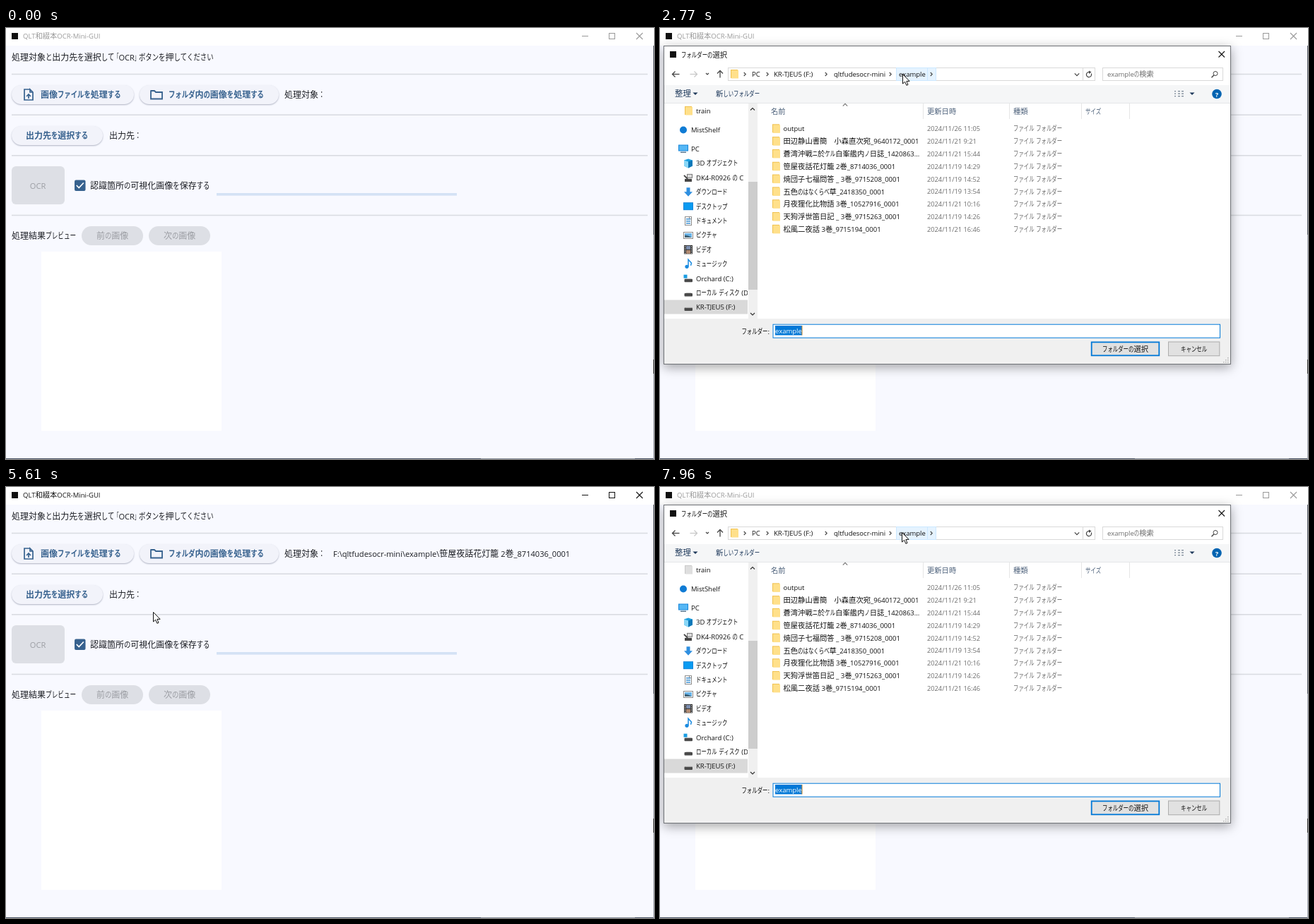
Recreate the animation shown at these times as an HTML page with a canvas. Size 917x611 px, loop 8000 ms.

```html
<!DOCTYPE html>
<html lang="ja">
<head>
<meta charset="utf-8">
<title>Folder picker</title>
<style>
html, body { margin: 0; width: 100%; height: 100%; overflow: hidden; background: #f8f9ff; }
canvas { display: block; width: 917px; height: 611px; }
</style>
</head>
<body>
<canvas id="stage"></canvas>
<script>
const W = 917, H = 611, LOOP = 8000, STEP = 65;
const canvas = document.getElementById('stage');
const ctx = canvas.getContext('2d');
const dpr = window.devicePixelRatio || 1;
canvas.width = W * dpr;
canvas.height = H * dpr;

const APP = 'QLT和綴本OCR-Mini-GUI';
const REPO = 'qltfudesocr-mini';
const DRIVE = 'KR-TJEU5 (F:)';
const BOOK = '笹屋夜話花灯籠 2巻_8714036_0001';
const BLUE = '#36618e', ACCENT = '#0078d7';

const FILES = [
  ['output', '26 11:05'],
  ['田辺静山書簡　小森直次宛_9640172_0001', '21 9:21'],
  ['蒼湾沖戦ニ於ケル白峯艦内ノ日誌_1420863...', '21 15:44'],
  [BOOK, '19 14:29'],
  ['焼団子七福問答 _ 3巻_9715208_0001', '19 14:52'],
  ['五色のはなくらべ草_2418350_0001', '19 13:54'],
  ['月夜狸化比物語 3巻_10527916_0001', '21 10:16'],
  ['天狗浮世笛日記 _ 3巻_9715263_0001', '19 14:26'],
  ['松風二夜話 3巻_9715194_0001', '21 16:46']
];

const PLACES = [
  ['3D オブジェクト', 'cube'], ['DK4-R0926 の C', 'device'], ['ダウンロード', 'down'],
  ['デスクトップ', 'desktop'], ['ドキュメント', 'page'], ['ピクチャ', 'picture'],
  ['ビデオ', 'film'], ['ミュージック', 'note'], ['Orchard (C:)', 'system'],
  ['ローカル ディスク (D', 'drive'], [DRIVE, 'drive']
];

// time, x, y of the pointer
const PATH = [
  [180, 905, 330], [760, 287, 98], [1240, 287, 98], [1650, 360, 82], [1860, 360, 82],
  [1980, 343, 65], [2770, 343, 65], [2900, 232, 176], [3080, 232, 176], [3300, 221, 219],
  [3610, 221, 219], [3740, 221, 200], [4400, 221, 200], [5000, 655, 451], [5210, 655, 451],
  [5460, 240, 215], [5600, 240, 215], [5610, 208, 177], [5870, 78, 152], [6200, 78, 152],
  [6390, 156, 137], [6450, 156, 137], [7000, 342, 64]
];
const CLICKS = [[820, 940], [1990, 2160], [3740, 3800], [3860, 3920], [5060, 5210], [6000, 6130], [7310, 7450]];

const within = (t, a, b) => t >= a && t < b;

function pointer(t) {
  if (t < PATH[0][0]) return null;
  const i = PATH.findIndex(k => k[0] > t);
  if (i < 0) return PATH[PATH.length - 1].slice(1);
  const [t0, x0, y0] = PATH[i - 1], [t1, x1, y1] = PATH[i];
  const u = Math.floor((t - t0) / STEP) * STEP / (t1 - t0);
  const e = u * u * (3 - 2 * u);
  return [x0 + (x1 - x0) * e, y0 + (y1 - y0) * e];
}

// ---- drawing helpers ----
function rect(x, y, w, h, fill) { ctx.fillStyle = fill; ctx.fillRect(x, y, w, h); }

function frame(x, y, w, h, color, lw = 1) {
  ctx.strokeStyle = color;
  ctx.lineWidth = lw;
  ctx.strokeRect(x + lw / 2, y + lw / 2, w - lw, h - lw);
}

function round(x, y, w, h, r, fill) {
  ctx.beginPath();
  ctx.roundRect(x, y, w, h, r);
  ctx.fillStyle = fill;
  ctx.fill();
}

function disc(x, y, r, fill) {
  ctx.beginPath();
  ctx.arc(x, y, r, 0, 7);
  ctx.fillStyle = fill;
  ctx.fill();
}

function line(pts, color, lw = 1) {
  ctx.beginPath();
  for (let i = 0; i < pts.length; i += 2) ctx.lineTo(pts[i], pts[i + 1]);
  ctx.strokeStyle = color;
  ctx.lineWidth = lw;
  ctx.stroke();
}

function poly(pts, fill) {
  ctx.beginPath();
  for (let i = 0; i < pts.length; i += 2) ctx.lineTo(pts[i], pts[i + 1]);
  ctx.closePath();
  ctx.fillStyle = fill;
  ctx.fill();
}

// UI lettering: narrow kana, half-width brackets, full kanji, slightly smaller Latin
const RUNS = /[「」]+|[\u3001-\u300b\u300e-\u30ff\uff01-\uff5e]+|[\u3000\u3400-\u9fff]+|[^\u3000-\u9fff\uff01-\uff5e]+/g;
const BRACKET = /^[「」]/, KANA = /^[\u3001-\u30ff\uff01-\uff5e]/, KANJI = /^[\u3000\u3400-\u9fff]/;

function text(s, x, y, { size = 10.3, color = '#111', align = 0, weight = 400, kana = 0.72 } = {}) {
  const runs = s.match(RUNS).map(str => {
    const cjk = KANA.test(str) || KANJI.test(str);
    const font = cjk
      ? `${weight} ${size}px "Noto Sans CJK JP", "Noto Sans CJK", sans-serif`
      : `${weight} ${size * 0.925}px "Open Sans", "Noto Sans", sans-serif`;
    ctx.font = font;
    const k = BRACKET.test(str) ? 0.5 : KANA.test(str) ? kana : 1;
    return { str, font, k, w: ctx.measureText(str).width * k };
  });
  x -= align * runs.reduce((sum, r) => sum + r.w, 0);
  ctx.fillStyle = color;
  for (const r of runs) {
    ctx.save();
    ctx.translate(x, y + size * 0.37);
    ctx.scale(r.k, 1);
    ctx.font = r.font;
    ctx.fillText(r.str, 0, 0);
    ctx.restore();
    x += r.w;
  }
}

function chevron(x, y, dir, color = '#444', s = 2.5) {
  if (dir === 'right') line([x - s / 2, y - s, x + s / 2, y, x - s / 2, y + s], color, 1.1);
  else {
    const d = dir === 'down' ? s / 2 : -s / 2;
    line([x - s, y - d, x, y + d, x + s, y - d], color, 1.2);
  }
}

function arrow(x, y, dir, color) {
  ctx.save();
  ctx.translate(x, y);
  ctx.rotate(dir * Math.PI / 2);
  line([5, 0, -5, 0], color, 1.3);
  line([-1, -4, -5, 0, -1, 4], color, 1.3);
  ctx.restore();
}

function folder(x, y, front = '#ffe08a', back = '#f0c14f') {
  rect(x, y - 6, 10, 12, back);
  rect(x + 1, y - 5, 10, 11.5, front);
}

function sheet(x, y) {
  rect(x, y - 6, 10, 13, '#fff');
  frame(x, y - 6, 10, 13, '#8a8a8a');
  line([x + 6.5, y - 6, x + 6.5, y - 2.5, x + 10, y - 2.5], '#8a8a8a');
}

function monitor(x, y, stand) {
  rect(x, y - 5.5, 14, stand ? 9 : 11, '#1685d9');
  rect(x + 1, y - 4.5, 12, stand ? 7 : 9, stand ? '#55b7f5' : '#0a9bf2');
  if (stand) rect(x + 3, y + 4.5, 8, 1.5, '#5f7d95');
}

function drive(y) {
  round(34.5, y + 1, 11.5, 4.5, 1, '#4a4a4a');
  poly([36, y + 1, 37.5, y, 43.5, y, 45, y + 1], '#c9c9c9');
}

const ICONS = {
  cube(y) {
    poly([34, y - 4, 40, y - 6, 46, y - 4, 46, y + 4, 40, y + 7, 34, y + 4], '#1ba1e2');
    poly([34, y - 4, 40, y - 2, 40, y + 7, 34, y + 4], '#8ad7f7');
    poly([40, y - 2, 46, y - 4, 46, y + 4, 40, y + 7], '#0b78b8');
  },
  device(y) {
    rect(38, y - 5, 8, 6, '#777');
    rect(39, y - 4, 6, 4, '#ddd');
    line([34, y - 3, 39, y + 2], '#444', 2);
    rect(35, y + 2, 10, 4, '#444');
  },
  down(y) {
    poly([37.5, y - 6, 42.5, y - 6, 42.5, y, 46, y, 40, y + 6.5, 34, y, 37.5, y], '#2f8fe0');
  },
  desktop(y) { monitor(33, y, false); },
  page(y) {
    sheet(35, y);
    for (const d of [-3, 0, 3]) rect(37, y + d, 6, 1.5, '#3c8fd0');
  },
  picture(y) {
    rect(33, y - 4.5, 14, 10, '#fff');
    frame(33, y - 4.5, 14, 10, '#8a8a8a');
    rect(35, y - 2.5, 10, 6, '#6ab4e8');
    poly([35, y + 3.5, 35, y, 40, y + 1, 45, y + 3.5], '#3d6073');
  },
  film(y) {
    rect(34, y - 6, 12, 12.5, '#333');
    rect(37, y - 5, 6, 5, '#7d8fb0');
    rect(37, y + 1, 6, 5, '#b08a72');
    for (let d = -4.5; d < 6; d += 3) { rect(35, y + d, 1, 1.5, '#eee'); rect(44, y + d, 1, 1.5, '#eee'); }
  },
  note(y) {
    disc(38, y + 4, 2.6, '#1b8be0');
    line([40, y + 4, 40, y - 6, 44.5, y - 1, 43.5, y + 2.5], '#1b8be0', 1.5);
  },
  system(y) { drive(y); rect(33.5, y - 5, 5, 5, '#1b9de2'); },
  drive
};

// ---- main window ----
function pill(x, y, w, label, lx, hot, off) {
  ctx.save();
  if (!off) {
    ctx.shadowColor = 'rgba(40,50,80,.35)';
    ctx.shadowBlur = 2 * dpr;
    ctx.shadowOffsetY = dpr;
  }
  round(x, y, w, 27, 13.5, off ? '#dddfe5' : hot ? '#e2e8f3' : '#f2f3fa');
  ctx.restore();
  text(label, lx, y + 13.8, { size: 12, kana: 0.78, color: off ? '#9b9da3' : BLUE, weight: off ? 500 : 700 });
}

function windowButtons(color) {
  line([815, 11.5, 824, 11.5], color);
  frame(853, 7, 9, 9, color);
  line([892, 7, 901, 16], color, 1.1);
  line([901, 7, 892, 16], color, 1.1);
}

function mainWindow(t, p, active, open) {
  const body = { size: 12, kana: 0.78, color: '#1b1d22' };
  const over = (x, y, w) => !open && p && p[0] > x && p[0] < x + w && p[1] > y && p[1] < y + 28;
  rect(0, 0, W, H, '#f8f9ff');
  rect(0, 0, W, 25, '#fff');
  rect(8, 7, 9, 9, '#111');
  text(APP, 24, 11.5, { color: active ? '#111' : '#999' });
  windowButtons(active ? '#111' : '#999');

  text('処理対象と出力先を選択して「OCR」ボタンを押してください', 8, 42, body);
  for (const y of [64.7, 122.4, 180, 264.7]) rect(8, y, 900, 1.6, '#dadce2');

  pill(8, 81, 173, '画像ファイルを処理する', 49, over(8, 81, 173));
  line([34, 87, 26, 87, 26, 102, 38, 102, 38, 91, 34, 87, 34, 91, 38, 91], BLUE, 1.7);
  line([32, 100, 32, 94], BLUE, 1.7);
  line([29, 97, 32, 94, 35, 97], BLUE, 1.7);
  pill(189, 81, 197, 'フォルダ内の画像を処理する', 230, over(189, 81, 197));
  line([205, 89, 210, 89, 212, 91, 221, 91, 221, 100.5, 205, 100.5, 205, 88.2], BLUE, 1.8);
  text('処理対象：', 394, 95, body);
  if (t >= 5330) text(`F:\\${REPO}\\example\\${BOOK}`, 463, 95, body);

  pill(8, 139, 129, '出力先を選択する', 28, over(8, 139, 129));
  text('出力先：', 146, 152.5, body);

  round(8, 196, 75, 54, 6, '#dddfe5');
  text('OCR', 45, 224, { size: 12, color: '#9b9da3', align: 0.5, weight: 500 });
  round(97, 215.5, 15.5, 15.5, 2, BLUE);
  line([99.8, 223, 103.2, 226.5, 109.8, 219.5], '#fff', 1.7);
  text('認識箇所の可視化画像を保存する', 119, 223.5, body);
  rect(298, 234, 340, 3.6, '#d4e2f5');

  text('処理結果プレビュー', 8, 294.5, { ...body, kana: 0.72 });
  pill(107, 281, 87, '前の画像', 128, false, true);
  pill(202, 281, 87, '次の画像', 223, false, true);
  rect(50, 317, 255, 254, '#fff');

  rect(0, 610, W, 1, '#4c5566');
  rect(672, 610, 218, 1, '#8a909c');
  rect(916, 25, 1, 268, '#555b66');
  rect(916, 293, 1, 318, '#a9adb8');
  rect(916, 470, 1, 20, '#333');
}

// ---- folder dialog ----
function crumbs(s) {
  const items = s.view === 'book'
    ? [[DRIVE, 130], [REPO, 214], ['example', 306], [BOOK, 363]]
    : [['PC', 130], [DRIVE, 161], [REPO, 246], ['example', 338]];
  const marks = s.view === 'book' ? [204, 296, 352] : [120, 152, 235, 326, 384];
  if (s.view === 'output') items.push(['output', 394]);
  const hotX = s.view === 'book' ? 302 : 334;
  if (s.hot) {
    rect(hotX, 56, 57, 19, s.hot > 1 ? '#cce8ff' : '#e5f3ff');
    frame(hotX, 56, 45, 19, s.hot > 1 ? '#99d1ff' : '#cce8ff');
    frame(hotX + 44, 56, 13, 19, s.hot > 1 ? '#99d1ff' : '#cce8ff');
  }
  folder(100, 65);
  if (s.view === 'book') text('«', 116, 64.5);
  marks.forEach((x, i) => chevron(x, 65.5, s.drop && i === marks.length - 1 ? 'down' : 'right'));
  for (const [label, x] of items) text(label, x, 65.5);
}

function navigation(s) {
  const idle = '#c8c8c8', ink = '#444';
  arrow(22.5, 65.5, 0, s.back ? ink : idle);
  arrow(47.5, 65.5, 2, idle);
  chevron(67, 65, 'down', s.back ? ink : idle, 2);
  arrow(85, 65.5, 1, ink);
  frame(96, 56, 520, 19, '#d9d9d9');
  crumbs(s);
  rect(598, 56, 1, 19, '#d9d9d9');
  chevron(590, 66, 'down', '#444', 3.2);
  ctx.beginPath();
  ctx.arc(607, 66, 3.6, -0.4, 4.9);
  ctx.strokeStyle = ink;
  ctx.lineWidth = 1.2;
  ctx.stroke();
  poly([607, 60.5, 610.5, 62.5, 607, 65], ink);

  if (!s.ready) {
    rect(627, 56, 1, 19, '#d9d9d9');
    rect(796, 56, 1, 19, '#d9d9d9');
    return;
  }
  frame(626, 56, 171, 19, '#d9d9d9');
  const hint = s.view === 'book' ? BOOK.slice(0, -4) + '...' : (s.view === 'list' ? 'example' : 'output') + 'の検索';
  text(hint, 633, 65.5, { color: '#6d6d6d' });
  ctx.beginPath();
  ctx.arc(786, 64.5, 3, 0, 7);
  ctx.strokeStyle = ink;
  ctx.stroke();
  line([784, 66.8, 780.5, 70.3], ink, 1.4);
}

function toolbar(s) {
  const ink = '#1e395b';
  rect(6, 81, 801, 25, '#f5f6f7');
  rect(6, 106, 801, 1, '#e4e6e8');
  disc(788, 93.5, 6.8, '#0063b1');
  text('?', 788, 93.7, { color: '#fff', align: 0.5, weight: 700 });
  if (!s.ready) return;
  text('整理', 21, 93, { size: 11.4, color: ink });
  text('新しいフォルダー', 79, 93, { color: ink });
  for (const x of [50, 753]) poly([x - 3.5, 91.5, x + 3.5, 91.5, x, 95], ink);
  if (s.view === 'book') {
    frame(728, 89, 13, 9, '#888');
    rect(730, 91, 6, 4, '#3d6073');
  } else {
    for (let i = 0; i < 3; i++) {
      for (const x of [728, 733, 738]) rect(x, 89 + i * 3.5, x > 730 ? 3 : 2, 1.3, '#7b8896');
    }
  }
}

function sidebar(s) {
  ctx.save();
  ctx.beginPath();
  ctx.rect(6, 107, 118, 305);
  ctx.clip();
  if (!s.ready && s.second) sheet(35, 117);
  else if (s.second) folder(35, 117, '#dedede', '#c9c9c9');
  else folder(35, 117);
  text('train', 51, 117.5);
  disc(33, 144.5, 5, '#0f7bd4');
  text('MistShelf', 44, 144.5);
  monitor(26, 171, true);
  text('PC', 44, 171.5);
  rect(6, 385.5, 118, 20, '#d9d9d9');
  PLACES.forEach(([label, icon], i) => {
    const y = 191.5 + i * 20.4;
    if (i > 7 && !s.ready) sheet(35, y);
    else ICONS[icon](y);
    text(label, 51, y);
  });
  ctx.restore();
  rect(125, 107, 13, 305, '#f0f0f0');
  rect(125, 218, 13, 153, '#cdcdcd');
  chevron(131, 115, 'up', '#333', 3);
  chevron(131, 405.5, 'down', '#333', 3);
}

function listing(s) {
  const grey = '#6d6d6d', headed = s.ready && s.view !== 'book';
  if (headed) {
    chevron(262, 109, 'up', '#777', 3.2);
    [['名前', 157], ['更新日時', 378], ['種類', 500], ['サイズ', 602]]
      .forEach(([label, x]) => text(label, x, 118, { color: '#4c607a' }));
    for (const x of [372, 494, 596, 664]) rect(x, 107, 1, 22, '#e5e5e5');
  }
  if (s.view !== 'list') {
    text('検索条件に一致する項目はありません。', 474, headed ? 147 : 126, { color: grey, align: 0.5 });
    return;
  }
  FILES.forEach(([name, date], i) => {
    const y = 142.3 + i * 17.82;
    if (i === s.row) rect(154, y - 8.8, 507.5, 17.8, s.picked ? '#cce8ff' : '#e5f3ff');
    folder(159, y);
    text(name, 174.5, y + 0.3);
    text('2024/11/' + date, 378, y + 0.3, { size: 10, color: grey });
    text('ファイル フォルダー', 500, y + 0.3, { color: grey });
  });
}

function pushButton(x, w, label, fill, edge, lw) {
  rect(x, 444.5, w, 20.7, fill);
  frame(x, 444.5, w, 20.7, edge, lw);
  text(label, x + w / 2, 455, { align: 0.5 });
}

function footer(s) {
  rect(6, 412, 801, 64, '#f0f0f0');
  text('フォルダー:', 155, 430, { align: 1 });
  rect(159.5, 419.7, 633.5, 20, '#fff');
  frame(159.5, 419.7, 633.5, 20, s.view === 'book' && s.field ? '#7a7a7a' : ACCENT);
  if (s.field === 'book') text(BOOK, 163, 429.5);
  else if (s.field === 'example') {
    rect(163, 422, 38, 13.5, ACCENT);
    text('example', 163, 429.5, { color: '#fff' });
    rect(200.5, 422, 1, 13.5, '#d08a2a');
  } else rect(163, 422, 1, 13.5, '#111');
  pushButton(609.8, 97.4, 'フォルダーの選択', s.press ? '#cce4f7' : s.aim ? '#e5f1fb' : '#e1e1e1', ACCENT, 1.8);
  pushButton(719, 73.3, 'キャンセル', '#e1e1e1', '#adadad', 1);
  for (let i = 0; i < 3; i++) {
    for (let j = 0; j <= i; j++) rect(803 - j * 3, 467 + i * 3, 1.5, 1.5, '#b5b5b5');
  }
}

function dialog(s) {
  ctx.save();
  ctx.globalAlpha = s.alpha;
  ctx.save();
  ctx.shadowColor = 'rgba(0,0,0,.36)';
  ctx.shadowBlur = 15 * dpr;
  ctx.shadowOffsetY = 4 * dpr;
  rect(5, 25, 803, 452, '#fff');
  ctx.restore();
  rect(14, 33, 9, 9, '#111');
  text('フォルダーの選択', 30, 38);
  line([790.5, 33, 799, 41.5], '#111', 1.1);
  line([799, 33, 790.5, 41.5], '#111', 1.1);
  navigation(s);
  toolbar(s);
  sidebar(s);
  listing(s);
  footer(s);
  frame(5, 25, 803, 452, '#6f7277');
  ctx.restore();
}

function dialogState(t, p) {
  const second = t > 5400;
  const view = t < 2200 ? 'output' : t < 4210 ? 'list' : t < 7400 ? 'book' : 'list';
  const hovering = view === 'list' && within(t, 2830, 4210);
  return {
    second, view,
    picked: within(t, 3780, 4210),
    alpha: within(t, 1000, 1060) || within(t, 5210, 5270) || within(t, 6260, 6320) ? 0.5 : 1,
    ready: second ? t >= 6580 : t >= 1250,
    back: second ? t >= 7400 : t >= 2200,
    hot: within(t, 2000, 2530) || within(t, 7310, 7960) ? 2
      : within(t, 1920, 2830) || t >= 6950 ? 1 : 0,
    drop: within(t, 2000, 2400) || within(t, 7310, 7770),
    row: hovering ? Math.floor((p[1] - 133.5) / 17.82) : -1,
    field: within(t, 3780, 5400) ? 'book' : within(t, 2340, 3780) || t >= 7530 ? 'example' : '',
    press: within(t, 5060, 5210),
    aim: within(t, 4930, 5400)
  };
}

function drawPointer([x, y], pressed) {
  if (pressed) disc(x + 1, y + 1, 10, 'rgba(232,222,40,.7)');
  ctx.save();
  ctx.translate(x, y);
  const shape = [0.5, 0.5, 0.5, 14, 3.6, 11.2, 5.9, 16.3, 8, 15.4, 5.9, 10.4, 10.1, 10.4];
  poly(shape, '#fff');
  line([...shape, 0.5, 0.5], '#111', 1);
  ctx.restore();
}

function draw(now) {
  const t = now % LOOP;
  const p = pointer(t);
  const open = within(t, 1000, 5270) || t >= 6260;
  const active = within(t, 820, 1000) || within(t, 5270, 6200);
  ctx.setTransform(dpr, 0, 0, dpr, 0, 0);
  mainWindow(t, p, active, open);
  if (open) dialog(dialogState(t, p));
  if (p) drawPointer(p, CLICKS.some(([a, b]) => within(t, a, b)));
}

let start;
function tick(now) {
  start ??= now;
  draw(Math.max(0, now - start));
  requestAnimationFrame(tick);
}
requestAnimationFrame(tick);
</script>
</body>
</html>
```
